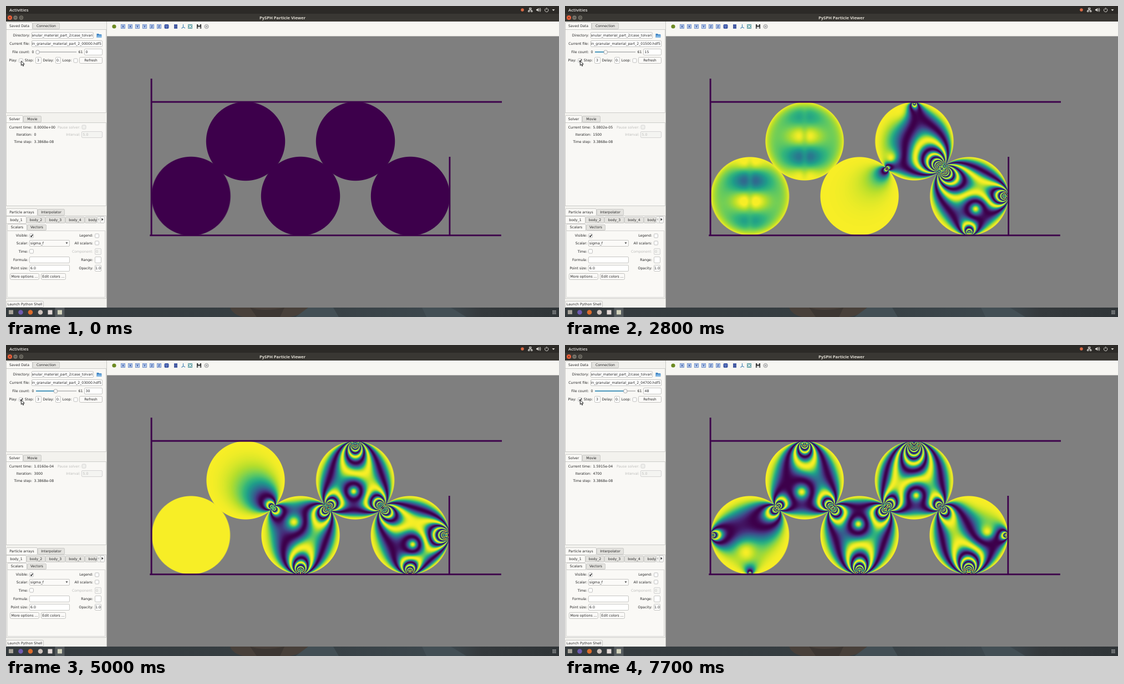
An HTML page with a canvas that plays this animation: 997 px wide and 561 px high, repeating every 8000 ms.

```html
<!DOCTYPE html>
<html lang="en">
<head>
<meta charset="utf-8">
<title>PySPH Particle Viewer</title>
<style>
html, body { margin: 0; width: 100%; height: 100%; overflow: hidden; background: #7f7f7f; }
canvas, svg { position: absolute; left: 0; top: 0; width: 997px; height: 561px; display: block; }
text { font: 6.2px "DejaVu Sans", sans-serif; fill: #262626; white-space: pre; }
.off { fill: #bcbcba; }
.end { text-anchor: end; }
.mid { text-anchor: middle; }
.bar { font: 600 7.9px "Open Sans", sans-serif; fill: #e4e2de; }
.title { font: 700 7.6px "Open Sans", sans-serif; fill: #dfdbd2; text-anchor: middle; }
.axis { font-size: 5.5px; font-weight: bold; fill: #2c4c9c; text-anchor: middle; }
.tick { fill: none; stroke: #222; stroke-width: 1.3; }
</style>
</head>
<body>
<canvas id="view" width="997" height="561"></canvas>
<svg id="ui" viewBox="0 0 997 561">
  <defs>
    <clipPath id="dirClip"><path d="M47 47H158V59H47Z"/></clipPath>
    <linearGradient id="desk">
      <stop offset="0" stop-color="#343a3d"/><stop offset=".5" stop-color="#363e42"/>
      <stop offset=".8" stop-color="#3d484e"/><stop offset=".86" stop-color="#34393c"/>
      <stop offset="1" stop-color="#2f3437"/>
    </linearGradient>
  </defs>
  <rect width="997" height="15" fill="#2c2a27"/>
  <rect y="14" width="997" height="14" fill="#393733"/>
  <text class="bar" x="6" y="9.8">Activities</text>
  <text class="title" x="498.5" y="23.7">PySPH Particle Viewer</text>
  <circle cx="7" cy="21" r="4" fill="#e9603a"/>
  <path d="M5.5 19.5l3 3m0-3l-3 3" stroke="#59271a" stroke-width=".8"/>
  <g fill="#77746b"><circle cx="17" cy="21" r="3.7"/><circle cx="27.5" cy="21" r="3.7"/></g>
  <path d="M15.3 21h3.4M26 19.5h3v3h-3z" fill="none" stroke="#3a3833" stroke-width=".8"/>
  <circle cx="931" cy="7" r="2.8" fill="#d96a45"/>
  <g fill="none" stroke="#dcdad5">
    <path d="M943.5 3.5h3.5v2h-3.5zM941.5 8.5h2.5v2h-2.5zM946.5 8.5h2.5v2h-2.5zM945.2 5.5v2M942.7 8v-.8h5V8"/>
    <path d="M961 4.5q1.5 2.5 0 5M962.8 3.5q2.2 3.5 0 7"/>
    <path d="M973.2 4.6a3.2 3.2 0 1 0 3 0M974.7 3v3.6"/>
  </g>
  <path d="M956 5.7h1.8l2.2-2v6.6l-2.2-2H956zM984.5 6h5l-2.5 3z" fill="#dcdad5"/>

  <rect y="28" width="182" height="516" fill="#f3f2ee"/>
  <rect x="182" y="28" width="815" height="26.5" fill="#f7f6f2"/>
  <path d="M181.500 28V544" stroke="#c9c9c5"/>
  <g id="toolbar">
    <circle cx="195" cy="37" r="3.6" fill="#6c8a22"/>
    <rect x="285.500" y="33" width="8" height="8" rx="2" fill="#3f58a6"/>
    <path d="M287 36h5M289.500 36v4" stroke="#8fa4da" stroke-width=".7"/>
    <rect x="303" y="33" width="6" height="8" fill="#5166ad"/>
    <path d="M303 35.500h6M303 38.500h6" stroke="#2c3f83" stroke-width=".7"/>
    <path d="M319.500 33v5l-3 2.500m3-2.500l3.500 2" fill="none" stroke="#4d87b8" stroke-width="1.2"/>
    <rect x="328" y="33" width="8" height="8" fill="#68a3a8"/>
    <path d="M329.500 34.500l5 5m0-5l-5 5" stroke="#f2f7f7" stroke-width="1.1"/>
    <rect x="344" y="33" width="8" height="8" fill="#303030"/>
    <path d="M346 33h4v2.500h-4zM345.500 37.500h5V41h-5z" fill="#ddd"/>
    <circle cx="361.500" cy="37" r="3.6" fill="#dedede" stroke="#999"/>
    <circle cx="361.500" cy="37" r="1.2" fill="#999"/>
  </g>

  <g id="panel"></g>
  <path d="M54 83H127" stroke="#c4c4c4" stroke-width="2"/>
  <path id="fill" stroke="#4b98bd" stroke-width="2"/>
  <rect id="knob" y="80" width="6" height="6.5" rx="2" fill="#fbfbfb" stroke="#999" stroke-width=".8"/>
  <g clip-path="url(#dirClip)"><text class="end" x="156.5" y="55.3">granular_material_part_2/case_tolvari</text></g>
  <text id="file" x="46.5" y="70.3"></text>
  <text id="count" x="143.5" y="85.3"></text>
  <text id="time" x="50.5" y="221.3"></text>
  <text id="iter" x="50.5" y="234.3"></text>
  <path d="M163.500 50h3.500l1 1.300h4.300V57h-8.800z" fill="#3e84c4"/>
  <path d="M163.500 57l1.500-4h7.700l-1 4z" fill="#7db4e3"/>
  <path d="M107.500 426.500h4l-2 2.600zM172.500 382.500v5l3-2.500z" fill="#333"/>
  <path d="M168 383v4l-2.500-2z" fill="#bbb"/>
  <path class="tick" d="M44.300 414.500l1.400 1.600 2.600-3.800"/>
  <path id="play" class="tick" d="M25.500 98.600l1.500 1.700 3-4"/>
  <path d="M27.400 99v8.200l2-1.800 1.300 3 1.300-.6-1.300-2.900h2.600z" fill="#f4f4f4" stroke="#111" stroke-width=".9"/>

  <rect y="544" width="997" height="17" fill="url(#desk)"/>
  <path d="M404 544q5 13 24 17h84q28-6 32-17z" fill="#48403a"/>
  <path d="M440 544q25 8 62 0l-8 17h-42z" fill="#3c3632"/>
  <path d="M545 544h45l10 17h-78zM750 544h52l28 17h-72z" fill="#434f55"/>
  <rect x="88.500" y="544" width="17" height="17" fill="#555b5e"/>
  <rect x="5" y="548.500" width="8" height="7.500" fill="#a8a39a"/>
  <circle cx="26.500" cy="552.500" r="4.300" fill="#6e5ab0"/>
  <circle cx="44" cy="552.500" r="4.300" fill="#dc6b2c"/>
  <circle cx="62" cy="552.500" r="4.300" fill="#cfc3bd"/>
  <rect x="75.500" y="548.500" width="8" height="8" fill="#e4dad8"/>
  <rect x="93" y="548.500" width="8" height="8" fill="#d2d2bb"/>
  <path d="M985.500 550h6M985.500 552.500h6M985.500 555h6" stroke="#d4d6d7" stroke-width="1.3" stroke-dasharray="1.3 1"/>
</svg>
<script>
const $ = id => document.getElementById(id);
const lerp = (a, b, u) => a + (b - a) * u;
const clamp = u => Math.min(1, Math.max(0, u));
const smooth = u => { u = clamp(u); return u * u * (3 - 2 * u); };

// ---- static widgets ----
const parts = [];
const text = (x, mid, s, cls = '') =>
  parts.push(`<text x="${x}" y="${mid + 2.3}" class="${cls}">${s}</text>`);
const box = (x, y, w, h, fill = '#fff', stroke = '#b9b9b6', r = 1.5) =>
  parts.push(`<rect x="${x + .5}" y="${y + .5}" width="${w - 1}" height="${h - 1}" rx="${r}" fill="${fill}" stroke="${stroke}" stroke-width=".8"/>`);
const check = (x, mid, off) => box(x, mid - 4, 8, 8, off ? '#f0f0ed' : '#fdfdfc', off ? '#ccc' : '#b0b0b0');
const pane = (y, h) => box(0, y, 181, h, '#f9f8f5', '#c3c3c0', 0);
const tabs = (y, h, edges, names) => names.forEach((name, i) => {
  const x = edges[i], w = edges[i + 1] - x;
  box(x, i ? y + 1 : y, w, i ? h - 1 : h + 1, i ? '#e4e3df' : '#faf9f6', '#c3c3c0');
  text(x + w / 2, y + h / 2, name, 'mid');
});
const button = (x, y, w, name) => {
  box(x, y, w, 12, '#fbfaf8', '#b5b5b2', 2);
  text(x + w / 2, y + 6, name, 'mid');
};
const labels = (x, cls, rows) =>
  Object.entries(rows).forEach(([name, y]) => text(x, y, name, cls));

pane(42, 151); tabs(29, 13, [0, 48, 97], ['Saved Data', 'Connection']);
pane(210, 151); tabs(197, 13, [0, 31, 64], ['Solver', 'Movie']);
pane(378, 150); tabs(365, 13, [0, 57, 106], ['Particle arrays', 'Interpolator']);
tabs(379, 13, [0, 37, 71, 107, 142, 164], ['body_1', 'body_2', 'body_3', 'body_4', '']);
text(148.5, 385.5, 'body');
box(164, 379, 8, 13, '#f0f0ed', '#ccc'); box(170, 379, 8, 13, '#f8f8f6', '#bbb');
box(2, 405, 177, 121, '#faf9f6', '#cdcdca', 0);
tabs(393, 12, [2, 38, 73], ['Scalars', 'Vectors']);

labels(43, 'end', { 'Directory:': 53, 'Current file:': 68, 'File count:': 83 });
labels(47, 'end', { 'Current time:': 219, 'Iteration:': 232, 'Time step:': 245 });
labels(40, 'end', { 'Visible:': 414, 'Scalar:': 427.5, 'Time:': 442.5, 'Formula:': 458, 'Point size:': 473 });
labels(157, 'end', { 'Legend:': 414, 'All scalars:': 427.5, 'Range:': 458, 'Opacity:': 473 });
labels(134, 'end off', { 'Pause solver:': 219, 'Interval:': 232 });
text(157, 442.5, 'Component:', 'end off');
text(20, 98, 'Play:', 'end'); text(50, 98, 'Step:', 'end');
text(86, 98, 'Delay:', 'end'); text(118.5, 98, 'Loop:', 'end');

box(46, 47, 112, 12); box(46, 62, 128, 12); box(141, 77, 33, 12);
box(53, 92, 11, 12); box(89, 92, 10, 12);
box(136, 226, 38, 12, '#f4f4f1', '#ccc'); box(160, 437, 12, 12, '#f4f4f1', '#ccc');
box(42, 422, 73, 12, '#fbfaf8'); box(42, 452, 73, 12); box(42, 467, 73, 12);
box(160, 452, 12, 12); box(160, 467, 12, 12);
check(23, 98.5); check(121.5, 98.5); check(136.5, 218.5, true);
check(42, 414.5); check(160, 414.5); check(160, 427.5); check(42, 442.5);
text(46.5, 83, '0'); text(130.5, 83, '61'); text(56, 98, '3'); text(91, 98, '0.');
text(138.5, 232, '5.0', 'off'); text(162, 442.5, '0', 'off');
text(50.5, 245, '3.3868e-08'); text(44, 427.5, 'sigma_f'); text(44, 473, '6.0'); text(161, 473, '1.0');
button(132, 92, 42, 'Refresh'); button(7, 482, 53, 'More options ...');
button(63, 482, 45, 'Edit colors ...'); button(0, 532, 68, 'Launch Python Shell');
$('panel').innerHTML = parts.join('');

parts.length = 0;
[...'XXYYZZ'].forEach((c, i) => {
  box(207 + 13 * i, 33, 8, 8, '#bfd3f0', '#5a7cc0', 0);
  text(211 + 13 * i, 36.7, c, 'axis');
});
$('toolbar').innerHTML += parts.join('');

// ---- photoelastic discs ----
const SIZE = 146, R = 71;
const PALETTE = ['#3d004b', '#462675', '#3e4a89', '#31688e', '#26828e', '#1f9e89', '#35b779', '#6dcd59', '#b4de2c', '#f7ee26']
  .map(hex => [1, 3, 5].map(i => parseInt(hex.slice(i, i + 2), 16)));
const LUT = Array.from({ length: 256 }, (_, i) => {
  const s = i / 255 * 9, k = Math.min(8, Math.floor(s));
  return PALETTE[k].map((a, j) => lerp(a, PALETTE[k + 1][j], s - k));
});

// A contact load builds up once the shock arrives, then swings as it echoes
const ECHO = 25;
const contact = (start, rise, mean, swing = 0, peak = 0) => count =>
  smooth((count - start) / rise) * (mean + swing * Math.cos(2 * Math.PI * (count - peak) / ECHO));

const wallRight = contact(0, 8, .52, .4, 9);
const floorRight = contact(7, 10, .47, .27, 23.5);
const rightPair = contact(5, 12, .62, .33, 12.5);
const topRight = contact(10, 16, .65, .32, 24);
const midRight = contact(10, 14, .36, .13, 26);
const floorMid = contact(22, 10, .6);
const midLeft = contact(18, 26, .39);
const topLeft = contact(36, 16, .6);
const leftPair = contact(30, 28, .38);
const wallLeft = contact(38, 16, .3);
const floorLeft = contact(43, 10, .1);

const [EAST, SE, SOUTH, SW, WEST, NW, NORTH, NE] =
  Array.from({ length: 8 }, (_, i) => [Math.cos(i * Math.PI / 4), Math.sin(i * Math.PI / 4)]);
const DISCS = [
  { x: 333.5, y: 343, ripple: { from: 3, to: 27, dir: 1, depth: .45 },
    touch: [[leftPair, NE], [wallLeft, WEST], [floorLeft, SOUTH]] },
  { x: 432, y: 244, ripple: { from: 15, to: 21, dir: -1, depth: .38 },
    touch: [[leftPair, SW], [midLeft, SE], [topLeft, NORTH]] },
  { x: 531, y: 343, touch: [[midLeft, NW], [midRight, NE], [floorMid, SOUTH]] },
  { x: 630, y: 244, drift: .015, touch: [[midRight, SW], [rightPair, SE], [topRight, NORTH]] },
  { x: 729, y: 343, drift: .023, touch: [[rightPair, NW], [wallRight, EAST], [floorRight, SOUTH]] }
];

// Principal stress difference: radial fields of point loads plus the inertial balance
function stress(x, y, forces) {
  let re = 0, im = 0;
  for (const [k, [px, py]] of forces) {
    const wx = x - px, wy = y - py, r2 = Math.max(wx * wx + wy * wy, 3e-4);
    const g = -k * (wx * px + wy * py) / (r2 * r2);
    re += g * (wx * wx - wy * wy) + k / 2 * (px * x - py * y);
    im += g * 2 * wx * wy + k / 2 * (px * y + py * x);
  }
  return Math.hypot(re, im);
}

// Faint symmetric wave that crosses a disc before any load reaches it
function rippleAt(dx, dy, count, { dir, depth }) {
  const bell = (u, w) => Math.exp(-u * u / (w * w));
  const age = Math.max(0, count - 9);
  const s = dir * dy - (.22 * age * age - 36);
  const crest = Math.cos(2 * Math.PI * s / 78) * bell(s, 90) * bell(dx, 32) * (1 - .4 * bell(dx, 7));
  const base = Math.min(.38, .1 + .03 * age);
  return (1 - clamp(Math.hypot(dx, dy) / R) ** 6) * (base + depth * crest);
}

const tile = document.createElement('canvas');
tile.width = tile.height = SIZE;
const tileCtx = tile.getContext('2d'), img = tileCtx.createImageData(SIZE, SIZE);
const view = $('view').getContext('2d');

function drawDisc({ x, y, drift = 0, touch, ripple }, count) {
  const forces = touch.map(([load, dir]) => [load(count), dir]);
  const rippling = ripple && count >= ripple.from && count <= ripple.to;
  const edge = count ? 70.6 : 71.2;
  for (let j = 0, o = 0; j < SIZE; j++) for (let i = 0; i < SIZE; i++, o += 4) {
    const dx = i + .5 - SIZE / 2, dy = j + .5 - SIZE / 2, rho = Math.hypot(dx, dy);
    let v = 0;
    if (count) {
      const d = stress(dx / R, dy / R, forces);
      v = Math.cos(Math.PI * d) ** 2;
      if (rippling) v -= rippleAt(dx, dy, count, ripple);
    }
    img.data.set(LUT[Math.round(255 * clamp(v))], o);
    img.data[o + 3] = 255 * clamp(edge - rho + .5);
  }
  tileCtx.putImageData(img, 0, 0);
  view.drawImage(tile, x - drift * count - SIZE / 2, y - SIZE / 2);
}

function drawView(count) {
  view.fillStyle = '#7f7f7f';
  view.fillRect(0, 0, 997, 561);
  DISCS.forEach(disc => drawDisc(disc, count));
  view.fillStyle = '#3d004b';
  view.fillRect(260.7, 131, 2.9, 283);
  view.fillRect(261, 171.6, 633, 2.9);
  view.fillRect(259.3, 412.3, 633.5, 2.9);
  view.fillRect(798.5 - .023 * count, 272, 2.8, 142);
}

function drawPanel(count) {
  // One extra file is saved at a round time, so later files lag by one
  const late = count > 36;
  const iter = (count - late) * 100;
  const time = iter * 3.3868e-8 - late * 3e-8;
  $('file').textContent = `in_granular_material_part_2_${String(iter).padStart(5, '0')}.hdf5`;
  $('count').textContent = count;
  $('iter').textContent = iter;
  $('time').textContent = time.toExponential(4).replace(/([+-])(\d)$/, '$10$2');
  const x = 57 + 1.08 * count;
  $('knob').setAttribute('x', x - 3);
  $('fill').setAttribute('d', `M54 83H${x}`);
}

// ---- playback: three files per step, on a 100 ms clock ----
const LOOP = 8000, FIRST = 600, STEP = 437.5;
let shown = -1;
function tick() {
  const t = performance.now() % LOOP;
  const clock = Math.floor(t / 100) * 100;
  const count = 3 * Math.max(0, Math.floor((clock - FIRST) / STEP));
  $('play').style.visibility = t >= 100 ? 'visible' : 'hidden';
  if (count !== shown) {
    shown = count;
    drawView(count);
    drawPanel(count);
  }
  requestAnimationFrame(tick);
}
tick();
</script>
</body>
</html>
```
